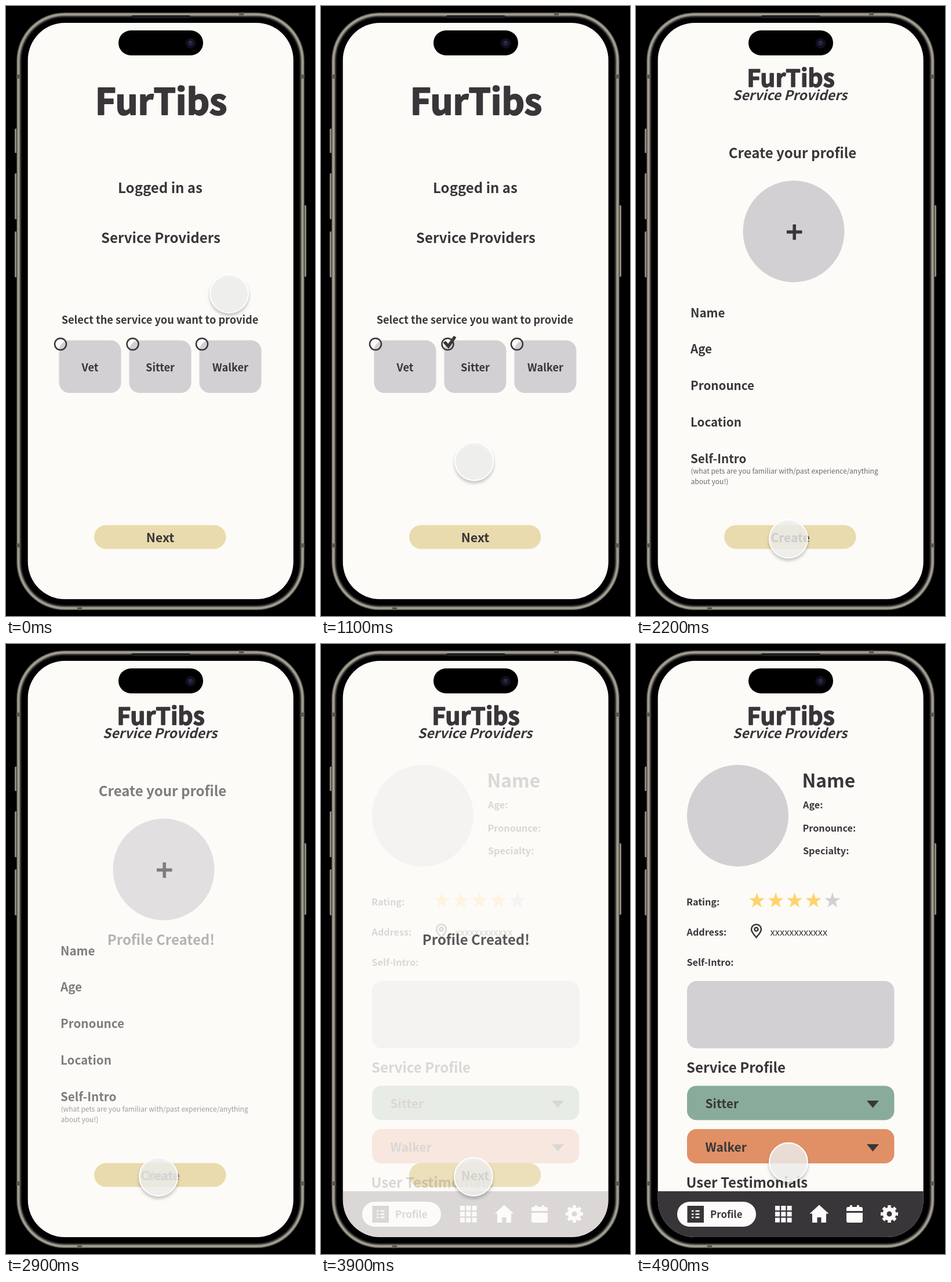
Write an HTML page that moves like this. It is 533 by 1050 pixels and loops after 5 s.

```html
<!DOCTYPE html>
<html lang="en">
<head>
<meta charset="utf-8">
<title>Pet service sign-up</title>
<style>
  html, body { margin: 0; width: 100%; height: 100%; overflow: hidden; background: #000; }
  svg { display: block; width: 100vw; height: 100vh; }
  text {
    font-family: "Noto Sans CJK SC", "Noto Sans CJK JP", "Noto Sans CJK", "Noto Sans", sans-serif;
    font-weight: 700; font-size: 24px; fill: #383638;
  }
  .mid { text-anchor: middle; }
  .brand { stroke: #383638; stroke-width: .034em; stroke-linejoin: round; }
  .tag { font-size: 18.2px; }
  .field { font-size: 20.6px; }
  .row { font-size: 16.2px; }
  .card { font-size: 21px; }
  .thin { font-size: 12.05px; font-weight: 300; fill: #6c6a6b; }
  .grey { fill: #d2d0d3; }
  .dark { fill: #383638; }
  .line { fill: none; stroke: #383638; stroke-width: 2.5; }
  .white { fill: #fdfcfa; }
  #touch { filter: drop-shadow(0 4px 2.5px rgba(0, 0, 0, .24)); }
</style>
</head>
<body>
<svg viewBox="0 0 533 1050" preserveAspectRatio="none">
  <defs>
    <clipPath id="screen"><rect x="37.700" y="29" width="458" height="992" rx="64"/></clipPath>
    <path id="star" d=""/>
    <path id="arrow" class="dark" d="M398 786h21l-10.500 12.500z"/>
  </defs>

  <!-- phone body -->
  <g fill="#8b877b">
    <rect x="15" y="211" width="5" height="42" rx="1.500"/>
    <rect x="15" y="288" width="5" height="79" rx="1.500"/>
    <rect x="15" y="388" width="5" height="79" rx="1.500"/>
    <rect x="513" y="343" width="5" height="123" rx="1.500"/>
  </g>
  <g id="body"></g>
  <path fill="#5b5850" d="M18 118h7v7h-7zM508 118h7v7h-7zM18 925h7v7h-7zM508 925h7v7h-7zM402 11h8v5h-8zM123 1035h8v5h-8z"/>
  <rect x="216" y="16" width="102" height="5" rx="2.500" fill="#1d1c22"/>

  <g clip-path="url(#screen)">
    <rect x="37" y="28" width="460" height="994" fill="#fdfbf8"/>
    <rect id="button" x="152" y="893.500" width="227.500" height="41" rx="20.500" fill="#e9dbad"/>

    <g id="choose">
      <text class="mid brand" x="267.500" y="187" style="font-size:61.500px">FurTibs</text>
      <text class="mid tag" x="265.500" y="546.500">Select the service you want to provide</text>
      <g id="options"></g>
      <path id="check" class="dark" d="M210.500 579.500l4.500-3 4.500 5 9.500-14 4.500 3-13.500 19.500z"/>
      <text class="mid" x="266" y="923" style="font-size:21.500px">Next</text>
    </g>

    <g id="role">
      <text class="mid" x="266" y="322">Logged in as</text>
      <text class="mid" x="267" y="408">Service Providers</text>
    </g>

    <text id="brand" class="mid brand" x="267" y="139" style="font-size:41px">FurTibs</text>
    <text id="subtitle" class="mid" x="265.500" y="162" style="font-size:23px;font-style:italic">Service Providers</text>

    <g id="create">
      <text class="mid" x="270" y="262">Create your profile</text>
      <circle class="grey" cx="272" cy="388" r="87.500"/>
      <path d="M260 389h26.500M273.200 376v26.500" fill="none" stroke="#383638" stroke-width="5.500"/>
      <g id="fields"></g>
      <text class="thin" x="94.500" y="805">(what pets are you familiar with/past experience/anything</text>
      <text class="thin" x="94.500" y="823">about you!)</text>
      <text class="mid" x="266" y="923" style="font-size:21px">Create</text>
    </g>

    <g id="created">
      <text class="mid" x="267.500" y="518">Profile Created!</text>
      <text class="mid" x="266" y="923" style="font-size:21.500px">Next</text>
    </g>

    <g id="profile">
      <circle class="grey" cx="175.500" cy="295.500" r="87.500"/>
      <text x="286.500" y="247" style="font-size:31.800px">Name</text>
      <g id="rows"></g>
      <g id="stars"></g>
      <path class="line" d="M207.500 505c-5-6-8.500-9.500-8.500-13.800a8.500 8.500 0 0 1 17 0c0 4.300-3.500 7.800-8.500 13.800z"/>
      <circle class="line" cx="207.500" cy="491" r="3"/>
      <text x="231.500" y="501.500" style="font-size:16.500px;font-weight:400">xxxxxxxxxxxx</text>
      <rect class="grey" x="88" y="580" width="357.500" height="116" rx="17"/>
      <text x="87" y="738">Service Profile</text>
      <rect x="88" y="760.500" width="357.500" height="59" rx="16" fill="#89ac9a"/>
      <rect x="88" y="835" width="357.500" height="59" rx="16" fill="#e19066"/>
      <text class="card" x="119.500" y="799">Sitter</text>
      <text class="card" x="119.500" y="874">Walker</text>
      <use href="#arrow"/>
      <use href="#arrow" y="75"/>
      <text x="86.500" y="936">User Testimonials</text>

      <rect class="dark" x="37" y="942" width="460" height="80"/>
      <rect class="white" x="71" y="960" width="136" height="43" rx="21.500"/>
      <rect class="dark" x="88.500" y="967" width="28.500" height="29"/>
      <path d="M96 976h3.500m3 0h7M96 981.500h3.500m3 0h7M96 987h3.500m3 0h7" stroke="#fdfcfa" stroke-width="2.500"/>
      <text x="128" y="988" style="font-size:16.900px">Profile</text>
      <g id="grid" class="white"></g>
      <path class="white" d="M316 965.500l16.500 15h-4.500v15.500h-8.500v-9h-7v9h-8.500v-15.500h-4.500z"/>
      <path class="white" d="M366 969h3v-3h4v3h8v-3h4v3h3q3 0 3 3v4h-28v-4q0-3 3-3zM363 979h28v14q0 3-3 3h-22q-3 0-3-3z"/>
      <g fill="none" stroke="#fdfcfa">
        <circle cx="437" cy="981" r="8" stroke-width="7"/>
        <circle cx="437" cy="981" r="12.500" stroke-width="5" pathLength="16" stroke-dasharray="1.100 .9" stroke-dashoffset=".55"/>
      </g>
    </g>

    <g id="touch">
      <circle r="33" fill="#f6f5f4" fill-opacity=".8" stroke="#fff" stroke-width="2"/>
    </g>
  </g>

  <rect x="194" y="42" width="146" height="43" rx="21.500"/>
  <circle cx="318.500" cy="64" r="9" fill="#100f1c"/>
  <circle cx="318.500" cy="64" r="4.500" fill="#232045"/>
  <circle cx="318" cy="62" r="1.500" fill="#3a3868"/>
</svg>

<script>
const $ = id => document.getElementById(id);
const fill = (id, items, draw) => { $(id).innerHTML = items.map(draw).join(""); };

// Nested rounded rectangles: [inset, colour]
fill("body", [[0, "#3f3d37"], [1, "#7d796e"], [2.2, "#a8a497"], [4.4, "#848074"],
              [6, "#45433e"], [7.4, "#1b1a1f"], [9, "#000"]],
  ([inset, color]) => `<rect x="${18 + inset}" y="${11 + inset}" width="${497 - 2 * inset}"
    height="${1029 - 2 * inset}" rx="${83 - inset}" fill="${color}"/>`);

fill("options", [["Vet", 91.5, 94], ["Sitter", 212.5, 218.5], ["Walker", 333.5, 338]],
  ([name, x, ring]) => `<rect class="grey" x="${x}" y="575.5" width="107" height="90.500" rx="18"/>
    <circle class="line" cx="${ring}" cy="582" r="10"/>
    <text class="mid tag" x="${x + 53.5}" y="629">${name}</text>`);

fill("fields", ["Name", "Age", "Pronounce", "Location", "Self-Intro"],
  (name, i) => `<text class="field" x="94" y="${535.5 + i * 62.8}">${name}</text>`);

fill("rows", [["Age:", 288, 283], ["Pronounce:", 287.5, 322.5], ["Specialty:", 288, 362],
              ["Rating:", 87, 449.5], ["Address:", 87.5, 502], ["Self-Intro:", 87.5, 554]],
  ([name, x, y]) => `<text class="row" x="${x}" y="${y}">${name}</text>`);

const starPath = Array.from({ length: 10 }, (_, i) => {
  const radius = i % 2 ? 5.6 : 14.2, angle = i * Math.PI / 5;
  return [radius * Math.sin(angle), -radius * Math.cos(angle)].map(v => v.toFixed(2));
}).join("L");
$("star").setAttribute("d", `M${starPath}z`);
fill("stars", [0, 1, 2, 3, 4],
  i => `<use href="#star" x="${208.5 + i * 32.6}" y="442" fill="${i < 4 ? "#ffd36c" : "#d2d0d3"}"/>`);

fill("grid", [...Array(9).keys()],
  i => `<rect x="${240 + i % 3 * 10.3}" y="${967 + Math.floor(i / 3) * 10.3}" width="8" height="8"/>`);

const ramp = (t, start, length) => Math.min(1, Math.max(0, (t - start) / length));
const easeInOut = x => x < .5 ? 4 * x ** 3 : 1 - 4 * (1 - x) ** 3;
const dissolve = (t, start) => 1 - (1 - ramp(t, start, 330)) ** 2;

function touchPosition(t) {
  const toOption = easeInOut(ramp(t, 0, 600));
  const toButton = easeInOut(ramp(t, 900, 380));
  const swipe = ramp(t, 4740, 320) ** 2;
  const bow = 16 * Math.sin(Math.PI * toButton);
  return [385 - 156 * toOption + 34 * toButton + bow,
          495 + 103 * toOption + 319 * toButton - 100 * swipe];
}

function draw(t) {
  const toCreate = dissolve(t, 1710);
  const toCreated = dissolve(t, 2836);
  const toProfile = dissolve(t, 3870);
  // The role lines and the subtitle are double layers, so they look denser mid-dissolve.
  const opacity = {
    choose: 1 - toCreate,
    role: 1 - toCreate ** 2,
    brand: toCreate,
    subtitle: 1 - (1 - toCreate) ** 2,
    create: toCreate * (1 - toCreated),
    created: toCreated * (1 - toProfile),
    profile: toProfile,
    button: 1 - toProfile,
    check: ramp(t, 640, 140)
  };
  for (const id in opacity) $(id).setAttribute("opacity", opacity[id]);
  $("touch").setAttribute("transform", `translate(${touchPosition(t)})`);
}

function frame() {
  draw(performance.now() % 5000);
  requestAnimationFrame(frame);
}
frame();
</script>
</body>
</html>
```
